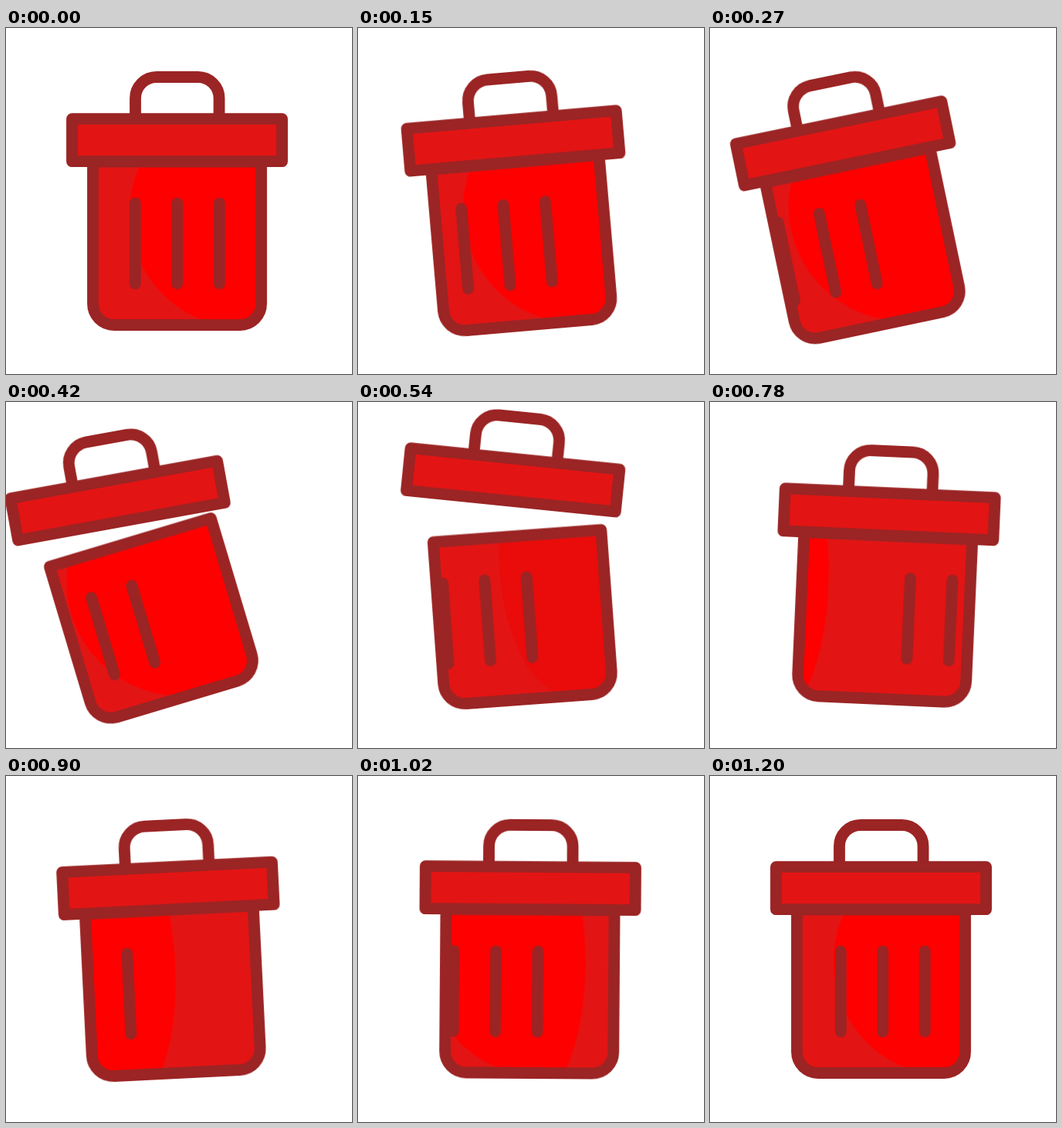
These frames come from a looping animation (448 px wide and 448 px high, 1800 ms). An HTML page without scripts:

```html
<!DOCTYPE html>
<html lang="en">
<head>
<meta charset="utf-8">
<title>Trash can</title>
<style>
  html, body { margin: 0; width: 100%; height: 100%; overflow: hidden; background: #fff; }
  svg { display: block; width: 100vw; height: 100vh; }

  .outline { fill: none; stroke: #9b2424; stroke-width: 14.8; stroke-linejoin: round; stroke-linecap: round; }
  .dark { fill: #e31414; }
  .bright { fill: #f00; }

  .can, .lid, .spin, .glow, .shade, .shade-in {
    animation: 1.8s cubic-bezier(.333, 0, .667, 1) infinite;
  }
  .can { transform-origin: 221.5px 384px; animation-name: swing; }
  .lid { transform-origin: 221.5px 145px; animation-name: pop; }
  .spin { animation-name: spin; }
  .glow { animation-name: glow; }
  .shade { animation-name: shade; }
  .shade-in { animation-name: shade-in; }

  @keyframes swing {
    0% { transform: rotate(0deg); }
    23.333% { transform: rotate(-16.7deg); }
    36.667% { transform: rotate(8deg); }
    50% { transform: rotate(-2.8deg); }
    60% { transform: rotate(1.5deg); }
    66.667%, 100% { transform: rotate(0deg); }
  }
  @keyframes pop {
    0%, 13.667% { transform: translateY(0) rotate(0deg); }
    30% { transform: translateY(-45px) rotate(10deg); }
    42.667%, 100% { transform: translateY(0) rotate(0deg); }
  }
  /* The pattern swings back, then turns once around the can. */
  @keyframes spin {
    0% { transform: translateX(0); }
    23.333% { transform: translateX(-69px); }
    66.667%, 100% { transform: translateX(278px); }
  }
  @keyframes glow {
    0%, 25% { fill: #f00; }
    30% { fill: #ea0b0b; }
    35%, 100% { fill: #f00; }
  }
  @keyframes shade {
    0% { d: path("M60 173H176C132 260 182 365 278 385H60Z"); }
    23.333% { d: path("M60 173H138C94 260 144 365 240 385H60Z"); animation-timing-function: ease-in; }
    30% { d: path("M60 173H197C188 260 205 360 268 385H60Z"); animation-timing-function: linear; }
    36.667% { d: path("M60 173H309C322 245 322 315 313 385H60Z"); animation-timing-function: linear; }
    39%, 100% { d: path("M60 173H345C358 245 358 315 349 385H60Z"); }
  }
  @keyframes shade-in {
    0%, 50% { transform: translateX(-170px); animation-timing-function: cubic-bezier(.3, .4, .6, 1); }
    66.667%, 100% { transform: translateX(0); }
  }
</style>
</head>
<body>
<svg viewBox="0 0 448 448">
  <defs>
    <path id="bin" d="M112.5 173H330.5V357a27.5 27.5 0 0 1-27.5 27.5H140a27.5 27.5 0 0 1-27.5-27.5Z"/>
    <clipPath id="inside"><use href="#bin"/></clipPath>
    <path id="bars" d="M167.3 227V331M221.8 227V331M276.3 227V331"/>
  </defs>
  <g class="can">
    <g clip-path="url(#inside)">
      <use href="#bin" class="glow"/>
      <path class="dark shade" d="M60 173H176C132 260 182 365 278 385H60Z"/>
      <path class="bright spin" d="M-400 173H56C68 240 62 330 35 385H-400Z"/>
      <path class="dark shade-in" d="M-60 173H176C132 260 182 365 278 385H-60Z"/>
      <g class="outline spin">
        <use href="#bars"/>
        <use href="#bars" x="-276"/>
      </g>
    </g>
    <use href="#bin" class="outline"/>
    <g class="lid">
      <path class="outline" d="M167.5 117V91a27.5 27.5 0 0 1 27.5-27.5H248.5a27.5 27.5 0 0 1 27.5 27.5V117"/>
      <rect class="dark" x="85.5" y="117.7" width="272" height="55"/>
      <rect class="outline" x="85.5" y="117.7" width="272" height="55"/>
    </g>
  </g>
</svg>
</body>
</html>
```
